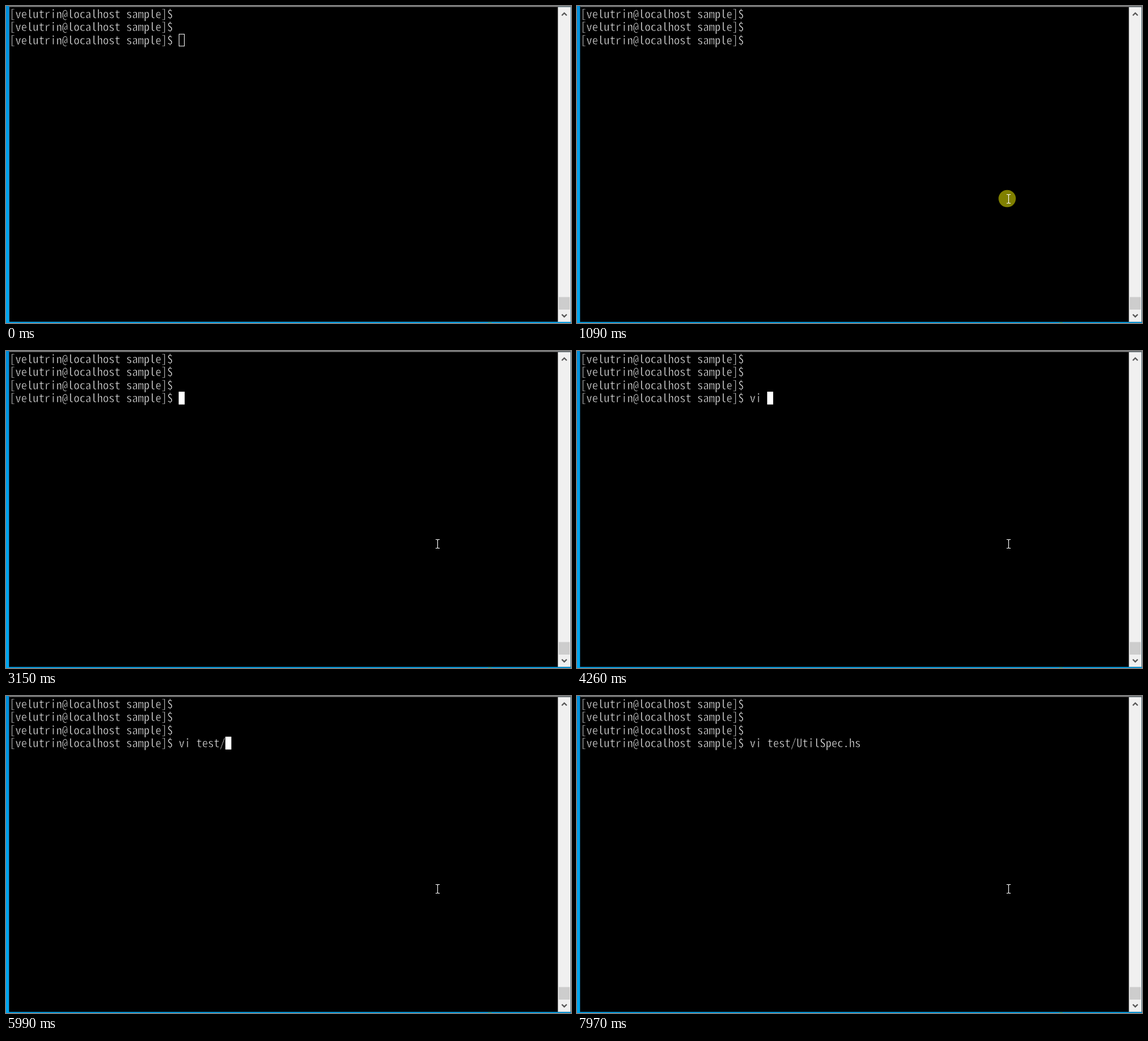
An HTML page for the animation above (8000 ms loop, 968x544 px).

```html
<!DOCTYPE html>
<html lang="en">
<head>
<meta charset="utf-8">
<title>Terminal session</title>
<style>
  html, body { margin: 0; width: 100%; height: 100%; overflow: hidden; background: #000; }
  svg { display: block; width: 968px; height: 544px; }
  /* The black outline thins the strokes to a light weight. */
  text {
    font: 300 20px "Noto Sans Mono CJK JP", "Noto Sans CJK JP", "Noto Sans Mono", monospace;
    fill: #f0f0f0;
    stroke: #000;
    stroke-width: 0.55;
    white-space: pre;
  }
  .chevron { fill: none; stroke: #555; stroke-width: 2.2; }
</style>
</head>
<body>
<svg viewBox="0 0 968 544">
  <defs>
    <linearGradient id="desk" x1="0" y1="0" x2="0" y2="1">
      <stop offset="0" stop-color="#008fdc"/>
      <stop offset="0.5" stop-color="#00a2ee"/>
      <stop offset="1" stop-color="#00a6f0"/>
    </linearGradient>
  </defs>
  <rect width="968" height="544" fill="url(#desk)"/>
  <rect x="826" y="543" width="6" height="1" fill="#3fb56a"/>
  <rect id="frame" x="5" width="963" height="542.4"/>
  <rect x="6" y="1" width="940" height="540.7"/>
  <rect x="5.5" width="962.5" height="1.6" fill="#808080"/>
  <rect x="945.5" y="2" width="21.8" height="540" fill="#f0f0f0"/>
  <rect x="947" y="499.5" width="19" height="21.5" fill="#cdcdcd"/>
  <path class="chevron" d="M952.3 16.2l4.2-4.2 4.2 4.2M952.3 529.2l4.2 4.2 4.2-4.2"/>
  <g id="rows"></g>
  <rect id="caret"/>
  <circle id="click" cx="737" cy="330.5" r="14.8" fill="#808000"/>
  <path id="beam" d="M-3.5 -7.5h2.5l1 1 1 -1h2.5M-3.5 7.5h2.5l1 -1 1 1h2.5M0 -6.5v13" fill="none" stroke="#fff" stroke-width="1.1"/>
  <path id="arrow" d="M0 0v16.5l3.8-3.6 2.6 6 2.6-1.1-2.6-5.9h5.3z" fill="#fff" stroke="#000"/>
</svg>
<script>
const LOOP = 8000, CELL = 10, PITCH = 22.5, LEFT = 6;
const PROMPT = "[velutrin@localhost sample]$ ";
const COMMAND = "vi test/UtilSpec.hs";
const FOCUS = 1090, RELEASE = 1210, ENTER = 2100;

// [time, typed characters, caret visible]
const keys = [
  [RELEASE, 0, 1], [1740, 0, 0],
  [ENTER, 0, 1], [2620, 0, 0], [3150, 0, 1], [3670, 0, 0],
  [3880, 1, 1], [4010, 2, 1], [4260, 3, 1], [4720, 4, 1],
  [4900, 5, 1], [5080, 6, 1], [5180, 7, 1], [5710, 7, 0],
  [5990, 8, 1], [6520, 8, 0], [7030, 8, 1], [7160, 9, 1],
  [7440, 19, 1], [7970, 19, 0]
];

const $ = id => document.getElementById(id);
const set = (el, attrs) => { for (const k in attrs) el.setAttribute(k, attrs[k]); };
const show = (el, on) => set(el, { visibility: on ? "visible" : "hidden" });

const rows = [0, 1, 2, 3].map(i => {
  const row = document.createElementNS("http://www.w3.org/2000/svg", "text");
  set(row, { x: LEFT, y: 20.5 + i * PITCH });
  row.textContent = PROMPT;
  return $("rows").appendChild(row);
});

function drawCaret(t, typed, on) {
  const hollow = t < FOCUS;
  const row = t < ENTER ? 2 : 3;
  const x = LEFT + (PROMPT.length + typed) * CELL;
  const y = 2.3 + row * PITCH;
  show($("caret"), hollow || on);
  set($("caret"), hollow
    ? { x: x + 0.5, y: y + 1, width: 9, height: 20.5, fill: "none", stroke: "#fff" }
    : { x: x - 0.2, y, width: 10.3, height: 22, fill: "#fff", stroke: "none" });
}

// The pointer slides in from the scroll bar in nine short steps.
function drawPointer(t) {
  const step = Math.min(8, Math.floor((t - 450) / 28.75));
  const rest = (1 - step / 8) ** 2;
  const x = 739.5 + 222.5 * rest, y = 331 + 121 * rest;
  const overBar = x > 945;
  show($("beam"), step >= 0 && !overBar);
  show($("arrow"), step >= 0 && overBar);
  for (const id of ["beam", "arrow"]) set($(id), { transform: `translate(${x} ${y})` });
}

function draw(t) {
  const [, typed, on] = keys.findLast(k => k[0] <= t) || [0, 0, 0];
  rows[3].textContent = PROMPT + COMMAND.slice(0, typed);
  show(rows[3], t >= ENTER);
  drawCaret(t, typed, on);
  drawPointer(t);
  show($("click"), t >= FOCUS && t < RELEASE);
  set($("frame"), { fill: t < FOCUS ? "#2b6f94" : "#0b2a3c" });
}

const start = performance.now();
function tick() {
  draw((performance.now() - start) % LOOP);
  requestAnimationFrame(tick);
}
tick();
</script>
</body>
</html>
```
